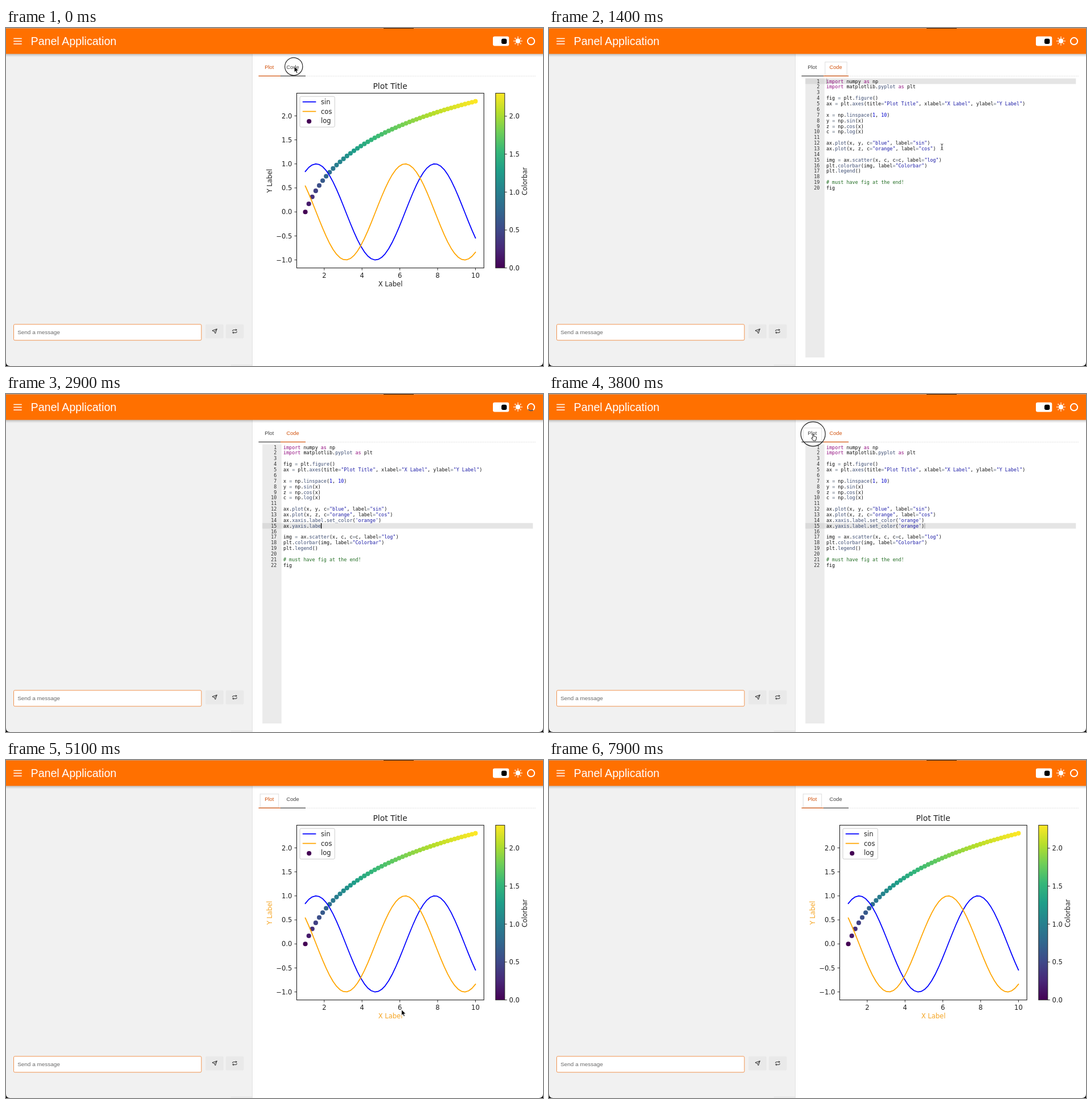
An HTML page that plays this animation: 943x594 px, repeating every 8 s.

```html
<!DOCTYPE html>
<html lang="en">
<head>
<meta charset="utf-8">
<title>Panel Application</title>
<style>
html, body { margin: 0; width: 100%; height: 100%; overflow: hidden; background: #fff; }
svg { display: block; position: absolute; left: 0; top: 0; }
text { white-space: pre; }
.ui { font-family: "Liberation Sans", Arial, sans-serif; }
.plot { font: 11.54px "DejaVu Sans", sans-serif; fill: #222; }
.code { font: 8.425px "DejaVu Sans Mono", monospace; fill: #111; }
.mid { text-anchor: middle; }
.end { text-anchor: end; }
.kw { fill: #930f80; } .str { fill: #1a1aa6; } .num { fill: #0000cd; }
.com { fill: #236e24; } .fn { fill: #3c4c72; } .op { fill: #687687; }
</style>
</head>
<body>
<svg width="943" height="594" viewBox="0 0 943 594">
  <defs>
    <linearGradient id="shade" x1="0" y1="0" x2="0" y2="1">
      <stop offset="0" stop-color="#000" stop-opacity=".22"/>
      <stop offset="1" stop-color="#000" stop-opacity="0"/>
    </linearGradient>
    <linearGradient id="viridis" x1="0" y1="1" x2="0" y2="0"></linearGradient>
  </defs>

  <rect width="943" height="594" fill="#fff"/>
  <rect width="432" height="594" fill="#f1f1f1"/>
  <rect x="432" width="1" height="594" fill="#e2e2e2"/>
  <rect x="395" y="591" width="37" height="3" fill="#eaeaea"/>

  <!-- header -->
  <rect y="45" width="943" height="6" fill="url(#shade)"/>
  <rect width="943" height="45.5" fill="#ff7000"/>
  <rect width="943" height="0.8" fill="#b9a596"/>
  <rect x="663" width="53" height="1" fill="#2a1c14"/>
  <path d="M13.3 18.6h14.4M13.3 23.3h14.4M13.3 28h14.4" stroke="#fff" stroke-width="1.5"/>
  <text class="ui" x="43.6" y="30" font-size="19.6" fill="#fff">Panel Application</text>
  <rect x="855" y="14.8" width="28.3" height="16.6" rx="3" fill="#fff"/>
  <rect x="870" y="18.7" width="9.4" height="9.2" rx="3" fill="#000"/>
  <g id="sun" fill="#fff" stroke="#fff" stroke-width="1.7" stroke-linecap="round"></g>
  <circle cx="922" cy="23.2" r="6.1" fill="none" stroke="#fff" stroke-width="2"/>
  <path id="spin" d="M922 17.1a6.1 6.1 0 0 1 6.1 6.1" fill="none" stroke="#6b4a35" stroke-width="2"/>

  <!-- chat input -->
  <rect x="13.5" y="520.8" width="329.6" height="28" rx="2" fill="#fff" stroke="#f09350"/>
  <text class="ui" x="20.2" y="538" font-size="9.95" fill="#6a6a6a">Send a message</text>
  <rect x="350.3" y="520.8" width="31.7" height="24.6" rx="2" fill="#e9e9e9"/>
  <rect x="386" y="520.8" width="31.5" height="24.6" rx="2" fill="#e9e9e9"/>
  <g fill="none" stroke="#222" stroke-width=".95" stroke-linejoin="round" stroke-linecap="round">
    <path d="M370.3 529.2l-2.7 7.8-1.7-3.4-3.4-1.7zM370.3 529.2l-4.4 4.4"/>
    <path d="M398 532.6v-.8q0-1.2 1.2-1.2h5.8m-1.4-1.5l1.5 1.5-1.5 1.5M405.2 533.4v.8q0 1.2-1.2 1.2h-5.8m1.4-1.5l-1.5 1.5 1.5 1.5"/>
  </g>

  <!-- tabs -->
  <path d="M526 84.5H931" stroke="#e4e4e4" stroke-dasharray="2 1"/>
  <rect id="focus" y="59.8" height="24" fill="none" stroke="#dedede"/>
  <path id="plotLine" d="M443.5 84.4H482" stroke-width="1.2"/>
  <path id="codeLine" d="M482 84.4H526" stroke-width="1.2"/>
  <text id="plotTab" class="ui mid" x="462.3" y="72" font-size="9.3">Plot</text>
  <text id="codeTab" class="ui mid" x="503.6" y="72" font-size="9.3">Code</text>

  <g id="plot" class="plot"></g>
  <g id="editor" class="code">
    <rect x="450.3" y="88.6" width="33.5" height="490.4" fill="#ebebeb"/>
    <rect id="rowGutter" x="450.3" width="33.5" height="9.87" fill="#dadada"/>
    <rect id="row" x="483.8" width="441.5" height="9.87" fill="#e5e5e5"/>
    <g id="lines"></g>
    <rect id="caret" height="9.4"/>
  </g>

  <!-- pointer -->
  <circle id="ring" fill="none" stroke="#222" stroke-width="1.2"/>
  <g id="pointer">
    <path id="arrow" d="M0 0V10.2L2.4 8 4 11.7 5.9 10.9 4.3 7.3H7.6Z" fill="#000" stroke="#fff" stroke-width=".8"/>
    <path id="beam" d="M-2.2 -5.2Q0 -5.2 0 -3.8Q0 -5.2 2.2 -5.2M0 -3.8V3.8M-2.2 5.2Q0 5.2 0 3.8Q0 5.2 2.2 5.2M-1.2 1.6H1.2" fill="none" stroke="#222" stroke-width=".9"/>
    <path id="hand" d="M-1.4 -5.2q1.1-1 1.9 0v3.6q1-.7 1.7.2 1-.5 1.5.3 1.2-.3 1.3 1v2.2l-1.1 3.9h-4.4l-3.2-4.4q.4-1.4 1.6-.5l.7.7z" fill="#fff" stroke="#111" stroke-width=".95" stroke-linejoin="round"/>
  </g>

  <path d="M0 587Q0 594 7 594H0zM943 587Q943 594 936 594H943z" fill="#000"/>
</svg>

<script>
const $ = id => document.getElementById(id);
const set = (el, attrs) => { for (const k in attrs) el.setAttribute(k, attrs[k]); return el; };
const add = (parent, tag, attrs, text) => {
  const el = set(document.createElementNS("http://www.w3.org/2000/svg", tag), attrs);
  if (text !== undefined) el.textContent = text;
  parent.appendChild(el);
  return el;
};
const show = (el, on) => { el.style.display = on ? "" : "none"; };

// Sun icon
add($("sun"), "circle", { cx: 899, cy: 22.8, r: 3.6 });
for (let i = 0; i < 8; i++) {
  const a = i * Math.PI / 4, c = Math.cos(a), s = Math.sin(a);
  add($("sun"), "path", { d: `M${899 + 6.4 * c} ${22.8 + 6.4 * s}L${899 + 6.9 * c} ${22.8 + 6.9 * s}` });
}

// Plot
const viridis = ["440154", "482878", "3e4a89", "31688e", "26828e", "1f9e89", "35b779", "6ece58", "b5de2b", "fde725"];
viridis.forEach((c, i) => add($("viridis"), "stop", { offset: i / 9, "stop-color": "#" + c }));
const channels = hex => [0, 2, 4].map(i => parseInt(hex.slice(i, i + 2), 16));
function shade(u) {
  const i = Math.min(8, Math.floor(u * 9)), f = u * 9 - i;
  const a = channels(viridis[i]), b = channels(viridis[i + 1]);
  return `rgb(${a.map((v, k) => Math.round(v + (b[k] - v) * f))})`;
}
const top10 = Math.log(10);
const px = x => 492.4 + 33.2 * x;
const py = y => 323.2 - 84.4 * y;
const pc = v => 421.7 - 133.35 * v;
const xs = Array.from({ length: 50 }, (_, i) => 1 + i * 9 / 49);
const plot = $("plot");
const label = (x, y, text, cls = "", extra = {}) => add(plot, "text", { x, y, class: cls, ...extra }, text);
const curve = (fn, color) => add(plot, "polyline", {
  points: xs.map(x => px(x) + "," + py(fn(x))).join(" "),
  fill: "none", stroke: color, "stroke-width": 1.75, "stroke-linejoin": "round", "stroke-linecap": "square"
});
const tick = d => add(plot, "path", { d, stroke: "#222", "stroke-width": 0.95 });
const sign = v => v.toFixed(1).replace("-", "\u2212");

xs.forEach(x => {
  const v = Math.log(x);
  add(plot, "circle", { cx: px(x), cy: py(v), r: 4.05, fill: shade(v / top10) });
});
curve(Math.sin, "#0000ff");
curve(Math.cos, "#ffa500");
add(plot, "rect", { x: 510.5, y: 114.6, width: 328.7, height: 307.1, fill: "none", stroke: "#222", "stroke-width": 1.1 });
for (let x = 2; x <= 10; x += 2) {
  tick(`M${px(x)} 421.7v4`);
  label(px(x), 438.6, x, "mid");
}
for (let y = -1; y <= 2; y += 0.5) {
  tick(`M510.5 ${py(y)}h-4`);
  label(502.4, py(y) + 4.2, sign(y), "end");
}
add(plot, "rect", { x: 859.8, y: 114.6, width: 16, height: 307.1, fill: "url(#viridis)", stroke: "#222" });
for (let v = 0; v <= 2; v += 0.5) {
  tick(`M875.8 ${pc(v)}h4`);
  label(883.4, pc(v) + 4.2, sign(v));
}
label(674.6, 107.4, "Plot Title", "mid", { style: "font-size:13.85px" });
const xLabel = label(675, 454.2, "X Label", "mid");
const yLabel = label(0, 0, "Y Label", "mid", { transform: "translate(466.8 268.6) rotate(-90)" });
label(0, 0, "Colorbar", "mid", { transform: "translate(915.4 269.4) rotate(-90)" });
add(plot, "rect", { x: 516, y: 120.3, width: 61.3, height: 53.8, rx: 2.2, fill: "#fff", "fill-opacity": 0.8, stroke: "#ccc" });
add(plot, "path", { d: "M520.8 129.8h23.6", stroke: "#0000ff", "stroke-width": 1.75 });
add(plot, "path", { d: "M520.8 146.6h23.6", stroke: "#ffa500", "stroke-width": 1.75 });
add(plot, "circle", { cx: 532.2, cy: 164, r: 4.05, fill: "#440154" });
["sin", "cos", "log"].forEach((s, i) => label(553, 133.8 + 16.8 * i, s));

// Editor
const source = `import numpy as np
import matplotlib.pyplot as plt

fig = plt.figure()
ax = plt.axes(title="Plot Title", xlabel="X Label", ylabel="Y Label")

x = np.linspace(1, 10)
y = np.sin(x)
z = np.cos(x)
c = np.log(x)

ax.plot(x, y, c="blue", label="sin")
ax.plot(x, z, c="orange", label="cos")

img = ax.scatter(x, c, c=c, label="log")
plt.colorbar(img, label="Colorbar")
plt.legend()

# must have fig at the end!
fig`.split("\n");
const typed = "ax.xaxis.label.set_color('orange')\nax.yaxis.label.set_color('orange')";
const STEP = 9.868, CHAR = 5.072;
const token = /(#.*)|("[^"]*"?|'[^']*'?)|\b(import|as)\b|\b(\d+)\b|(?<=\.)([a-z_]+)|(=)|[^#"'=.\w]+|\w+|\./g;
const kinds = ["com", "str", "kw", "num", "fn", "op"];
let drawn = "";

function drawCode(lines) {
  const key = lines.join("\n");
  if (key === drawn) return;
  drawn = key;
  const box = $("lines");
  box.textContent = "";
  lines.forEach((line, i) => {
    const y = 96.6 + i * STEP;
    add(box, "text", { x: 475.3, y, class: "end", fill: "#333" }, i + 1);
    const row = add(box, "text", { x: 487, y });
    for (const m of line.matchAll(token)) {
      const k = m.slice(1).findIndex(g => g !== undefined);
      add(row, "tspan", k < 0 ? {} : { class: kinds[k] }, m[0]);
    }
  });
}

function editorAt(t) {
  const lines = source.slice();
  let row = 0, col = 0;
  if (t >= 1700) { row = 12; col = lines[12].length; }
  if (t >= 2000) {
    const part = Math.max(0, Math.min(1, (t - 2200) / 1000));
    const extra = typed.slice(0, Math.round(part * typed.length)).split("\n");
    lines.splice(13, 0, ...extra);
    row = 12 + extra.length;
    col = extra[extra.length - 1].length;
  }
  drawCode(lines);
  const y = 88.6 + row * STEP;
  set($("row"), { y });
  set($("rowGutter"), { y });
  const live = t >= 1700 && t < 3600;
  set($("caret"), { x: 487 + col * CHAR, y: y + 0.2, width: live ? 1.3 : 0.8, fill: live ? "#000" : "#888" });
}

// Pointer stops: time, x, y, shape used from then on
const stops = [
  [0, 506.2, 67.6, "arrow"], [200, 506.2, 68, "hand"], [500, 520, 84, "beam"],
  [1200, 690, 209, "beam"], [2000, 690, 209, ""], [3100, 690, 209, "beam"],
  [3500, 480, 92, "hand"], [3700, 464.5, 76, "hand"], [4100, 464.5, 76, "hand"],
  [4400, 500, 130, "arrow"], [5000, 694.5, 438.8, "arrow"], [5700, 694.5, 438.8, "arrow"],
  [6500, 478.8, 264.6, "arrow"], [7200, 478.8, 264.6, "arrow"], [7600, 470, 290, ""], [8000, 470, 290, ""]
];
const shapes = ["arrow", "beam", "hand"];
function pointerAt(t) {
  const i = stops.findIndex(s => s[0] > t) - 1;
  const [t0, x0, y0, shape] = stops[i], [t1, x1, y1] = stops[i + 1];
  const u = (t - t0) / (t1 - t0), e = u * u * (3 - 2 * u);
  set($("pointer"), { transform: `translate(${x0 + (x1 - x0) * e} ${y0 + (y1 - y0) * e})` });
  shapes.forEach(s => show($(s), s === shape));
}

// Click rings: start, x, y, first radius, growth per 100 ms, length
const clicks = [
  [0, 505.3, 67.7, 15.6, 6, 200],
  [1600, 690, 209, 9, 6, 300],
  [3600, 463.7, 70.3, 9.5, 6, 300]
];
function ringAt(t) {
  const hit = clicks.find(c => t >= c[0] && t < c[0] + c[5]);
  show($("ring"), hit);
  if (hit) set($("ring"), { cx: hit[1], cy: hit[2], r: hit[3] + hit[4] * (t - hit[0]) / 100 });
}

function tabsAt(t) {
  const code = t >= 200 && t < 3900;
  show($("editor"), code);
  show(plot, !code);
  const on = "#d2540f", off = "#444";
  set($("plotTab"), { fill: code ? off : on });
  set($("codeTab"), { fill: code ? on : off });
  set($("plotLine"), { stroke: code ? off : on });
  set($("codeLine"), { stroke: code ? on : off });
  const onCode = t >= 200 && t < 1700;
  show($("focus"), onCode || t >= 3700);
  set($("focus"), onCode ? { x: 484.8, width: 38.4 } : { x: 446.3, width: 32.4 });
  const ink = t >= 3900 ? "#f5a524" : "#222";
  xLabel.style.fill = yLabel.style.fill = ink;
}

function draw(now) {
  const t = Math.floor(now % 8000 / 100) * 100;
  tabsAt(t);
  editorAt(t);
  pointerAt(t);
  ringAt(t);
  show($("spin"), t >= 2000 && t < 3400);
  set($("spin"), { transform: `rotate(${(t - 2200) * 0.72} 922 23.2)` });
}

const start = performance.now();
function loop() {
  draw(performance.now() - start);
  requestAnimationFrame(loop);
}
loop();
</script>
</body>
</html>
```
